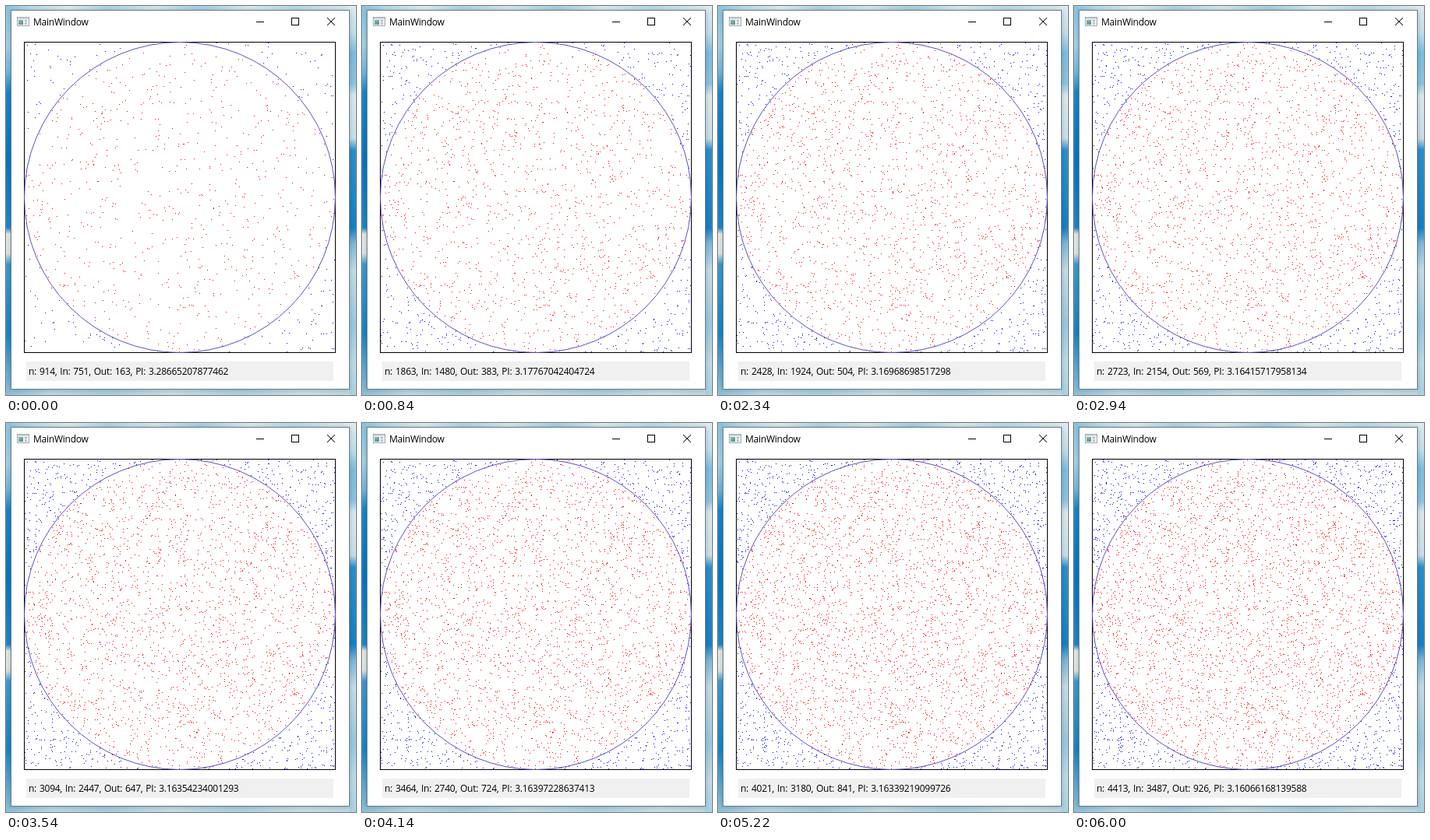
An HTML page with a canvas that plays this animation: 449 by 500 pixels, repeating every 6.06 s.

```html
<!DOCTYPE html>
<html lang="en">
<head>
<meta charset="utf-8">
<title>MainWindow</title>
<style>
html, body { margin: 0; width: 100%; height: 100%; overflow: hidden; background: #fff; }
canvas { display: block; }
</style>
</head>
<body>
<canvas id="stage" width="449" height="500"></canvas>
<script>
const W = 449, H = 500, LOOP = 6060, STEP = 60;
const ctx = document.getElementById('stage').getContext('2d');

// [time, points inside, points outside]
const KEYS = [
  [0, 751, 163], [840, 1480, 383], [1740, 1694, 438], [2940, 2154, 569],
  [4140, 2740, 724], [5220, 3180, 841], [6000, 3487, 926]
];
const MAX = KEYS[KEYS.length - 1];
const BOX = { x: 23, y: 46, size: 400 };

function seeded(s) {
  return () => {
    s = (s + 0x6d2b79f5) | 0;
    let t = Math.imul(s ^ (s >>> 15), 1 | s);
    t = (t + Math.imul(t ^ (t >>> 7), 61 | t)) ^ t;
    return ((t ^ (t >>> 14)) >>> 0) / 4294967296;
  };
}

function scatter() {
  const rand = seeded(314159), inside = [], outside = [];
  const coord = () => 1 + Math.floor(rand() * (BOX.size - 2));
  while (inside.length < MAX[1] || outside.length < MAX[2]) {
    const x = coord(), y = coord();
    const hit = Math.hypot(x - 199.5, y - 199.5) <= 199.5;
    (hit ? inside : outside).push([BOX.x + x, BOX.y + y]);
  }
  return { inside, outside };
}
const points = scatter();

function countsAt(t) {
  let i = 0;
  while (i < KEYS.length - 2 && t >= KEYS[i + 1][0]) i++;
  const a = KEYS[i], b = KEYS[i + 1];
  const k = Math.min(1, (t - a[0]) / (b[0] - a[0]));
  return [1, 2].map(c => Math.round(a[c] + (b[c] - a[c]) * k));
}

function rect(g, color, x, y, w, h) {
  g.fillStyle = color;
  g.fillRect(x, y, w, h);
}

function label(g, text, x, y) {
  g.font = '12px "Open Sans", "Noto Sans", sans-serif';
  g.letterSpacing = '-0.25px';
  g.wordSpacing = '1px';
  g.fillStyle = '#000';
  g.fillText(text, x, y);
}

function strip(g, x, y, w, h, stops) {
  const grad = w > h ? g.createLinearGradient(0, 0, W, 0) : g.createLinearGradient(0, 0, 0, H);
  const len = w > h ? W : H;
  stops.forEach(([at, color]) => grad.addColorStop(at / len, color));
  rect(g, grad, x, y, w, h);
}

function drawSky(g) {
  strip(g, 0, 0, W, 6, [
    [0, '#86c4e2'], [30, '#b4dbe8'], [80, '#dcebee'], [130, '#abd5e6'], [190, '#d3e7ec'],
    [250, '#a2d0e4'], [310, '#d8eaee'], [370, '#b6dae8'], [449, '#e0ecef']
  ]);
  strip(g, 0, 492, W, 8, [
    [0, '#8cc0da'], [60, '#bcdae6'], [130, '#a6cfe1'], [210, '#c8dfe8'],
    [300, '#abd2e3'], [380, '#cae0e8'], [449, '#bad9e6']
  ]);
  strip(g, 0, 0, 6, H, [
    [0, '#86c4e2'], [50, '#a4d2e5'], [85, '#70b9de'], [110, '#1688cc'], [200, '#0078c4'],
    [285, '#1d88c8'], [293, '#e8e9e2'], [318, '#dde6e4'], [332, '#3a9ad0'],
    [420, '#1686c6'], [470, '#62acd2'], [500, '#8cc0da']
  ]);
  strip(g, 440, 0, 9, H, [
    [0, '#dfebef'], [35, '#c0deea'], [60, '#7cbde0'], [100, '#8cc4e0'], [115, '#dbe8ec'],
    [170, '#c8dfe8'], [185, '#2a90cc'], [285, '#1680c4'], [305, '#7cb8d8'],
    [340, '#c4dde7'], [410, '#9ac8de'], [460, '#bedbe6'], [500, '#a8d0e2']
  ]);
}

function drawIcon(g) {
  rect(g, '#a3a9ad', 14, 14, 16, 12);
  rect(g, '#f1f3f4', 15, 15, 14, 10);
  rect(g, '#cdd4d9', 15, 15, 14, 2);
  const pane = g.createLinearGradient(16, 17, 22, 24);
  pane.addColorStop(0, '#93bdbb');
  pane.addColorStop(1, '#4f918c');
  rect(g, pane, 16, 18, 6, 6);
  rect(g, '#a9b7c2', 24, 18, 3, 2);
  rect(g, '#b9c7cf', 24, 21, 3, 3);
}

function drawButtons(g) {
  rect(g, '#000', 321, 20, 10, 1);
  g.strokeStyle = '#000';
  g.lineWidth = 1;
  g.strokeRect(366.5, 15.5, 9, 9);
  g.beginPath();
  g.moveTo(412, 15); g.lineTo(422, 25);
  g.moveTo(422, 15); g.lineTo(412, 25);
  g.stroke();
}

function makeBackdrop() {
  const layer = document.createElement('canvas');
  layer.width = W;
  layer.height = H;
  const g = layer.getContext('2d');
  drawSky(g);
  g.save();
  g.shadowColor = 'rgba(0, 20, 40, 0.25)';
  g.shadowBlur = 6;
  g.shadowOffsetY = 1;
  rect(g, '#6c7c86', 6, 5, 435, 488);
  g.restore();
  rect(g, '#fff', 7, 6, 433, 486);
  drawIcon(g);
  drawButtons(g);
  label(g, 'MainWindow', 35, 25);
  rect(g, '#f0f0f0', 26, 457, 394, 25);
  return layer;
}
const backdrop = makeBackdrop();

function drawPoints(list, count, color) {
  ctx.fillStyle = color;
  for (let i = 0; i < count; i++) ctx.fillRect(list[i][0], list[i][1], 1, 1);
}

function draw(time) {
  const t = Math.floor((time % LOOP) / STEP) * STEP;
  const [hits, misses] = countsAt(t);
  const n = hits + misses;
  const pi = Number((4 * hits / n).toPrecision(15));

  ctx.drawImage(backdrop, 0, 0);
  drawPoints(points.inside, hits, '#f00');
  drawPoints(points.outside, misses, '#00f');

  ctx.lineWidth = 1;
  ctx.strokeStyle = '#000';
  ctx.strokeRect(BOX.x + 0.5, BOX.y + 0.5, BOX.size - 1, BOX.size - 1);
  ctx.strokeStyle = '#5a50c8';
  ctx.beginPath();
  ctx.arc(BOX.x + 200, BOX.y + 200, 199.5, 0, Math.PI * 2);
  ctx.stroke();

  label(ctx, `n: ${n}, In: ${hits}, Out: ${misses}, PI: ${pi}`, 29, 474);
}

const start = performance.now();
function tick() {
  draw(performance.now() - start);
  requestAnimationFrame(tick);
}
tick();
</script>
</body>
</html>
```
